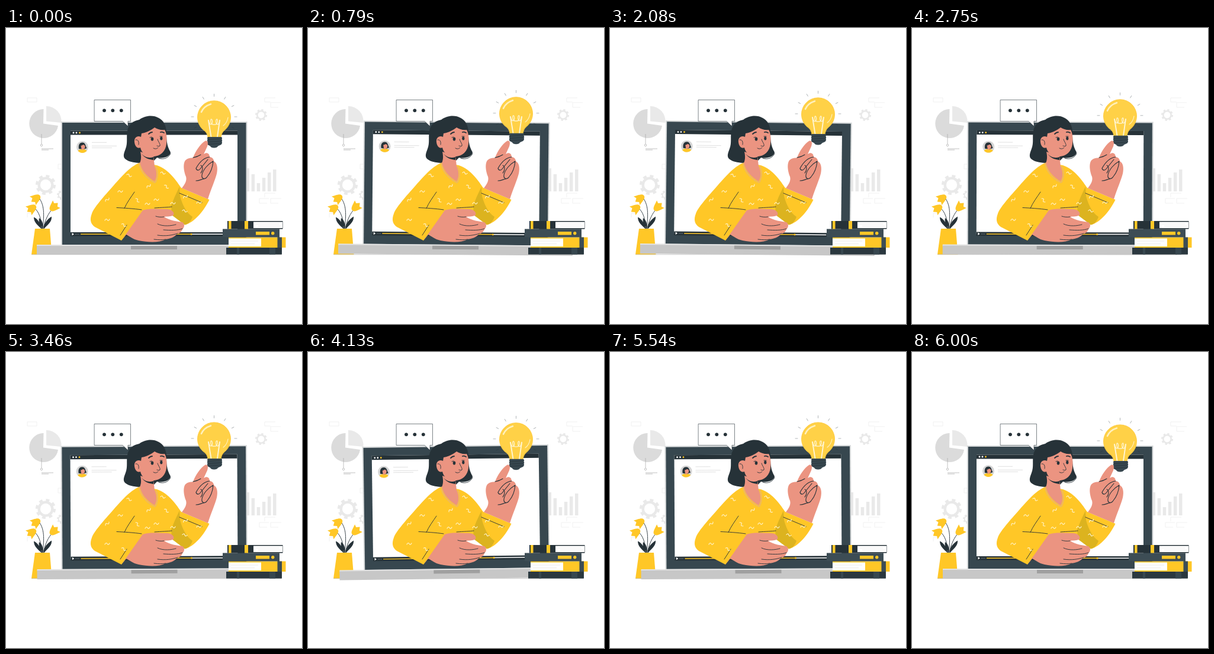
These frames come from a looping animation (500 by 500 pixels, 6.04 s). An HTML page:

```html
<!DOCTYPE html>
<html lang="en">
<head>
<meta charset="utf-8">
<title>Online lesson</title>
<style>
html, body { margin: 0; width: 100%; height: 100%; overflow: hidden; background: #fff; }
svg { display: block; width: 100%; height: 100%; }
.line { fill: none; stroke: #263238; stroke-linecap: round; stroke-linejoin: round; }
.faint { fill: none; stroke: #ebebeb; }
.dark { fill: #263238; }
.slate { fill: #37474f; }
.gold { fill: #ffc727; }
.skin { fill: #eb9481; }
</style>
</head>
<body>
<svg viewBox="0 0 500 500" stroke-width=".9">
  <!-- wall decorations -->
  <g id="wall">
    <path fill="#dbdbdb" d="M63 161.500L88 165A24.500 24.500 0 1 1 63.500 137Z"/>
    <path fill="#e9e9e9" d="M68 157.500V132A25.500 25.500 0 0 1 93.500 160Z"/>
    <path fill="none" stroke="#a6a6a6" stroke-width=".7" d="M60 179V196M60 204H80M60 206H72"/>
    <circle cx="60" cy="198" r="1.700" fill="#fff" stroke="#aaa" stroke-width=".7"/>
    <path class="faint" stroke-width=".7" d="M36 125V118H52V125ZM437 118H455M437 118V125H447M447 134V126H464M447 134H460M437 286V279H455M428 288H444M428 288V296H441M447 296V288H465M447 296H460M96 230H88V238H96M36 320V313H46"/>
  </g>

  <!-- plant -->
  <path class="line" d="M61.500 340C65 315 65 298 55 286M61 340C60 324 56 310 48 304M62.500 340C66 325 71 313 79 305"/>
  <path class="dark" d="M60.500 340C54 333 47 329 47 319.500C53 322 59 330 60.500 340ZM62 340C59 333 54 328 56 321C62 325 63 332 62 340ZM63.500 340C63 330 70 323 77 318.500C78 328 69 333 63.500 340Z"/>
  <g id="flowers" class="gold"></g>
  <path class="gold" d="M49 339H74L77.500 382.500H43Z"/>
  <path fill="none" stroke="#888" stroke-width=".4" d="M43 382.700H465"/>

  <g id="laptop">
    <path fill="#d5d8d9" d="M93 158H407.500V367H93Z"/>
    <path class="slate" d="M95 160H405.500V366H95Z"/>
    <path fill="#fff" d="M109 173.500H391V349H109Z"/>
    <path class="dark" d="M109 173.500H391V180.500H109ZM109 345H391V351.500H109Z"/>
    <g fill="#fff"><circle cx="114" cy="177" r="1.400"/><circle cx="119" cy="177" r="1.400"/></g>
    <circle class="gold" cx="124.500" cy="177" r="1.400"/>
    <path fill="#fff" d="M111.500 346L115 348.200L111.500 350.500ZM313 347.500H366V349H313Z"/>
    <path fill="none" stroke="#99a1a5" stroke-dasharray="1.500 1" d="M117 348.300H123.500"/>
    <path class="gold" d="M126 347.500H313V349H126Z"/>
    <circle class="gold" cx="313" cy="348.300" r="1.500"/>
    <circle cx="129" cy="201" r="10" fill="#d5d5d5"/>
    <path class="gold" d="M121.500 207.500C124 203.500 134 203.500 136.500 207.500A10 10 0 0 1 121.500 207.500Z"/>
    <path class="dark" d="M123 204C122 198 124 193.500 129 193.500C134 193.500 134 198 136.500 203L131 205Z"/>
    <path class="skin" d="M126.500 199L131 197L133.500 199C134 203 132 205 130 205L128 207Z"/>
    <path fill="none" stroke="#d3d3d3" stroke-width=".7" d="M145 193.300H170M145 199.300H187M145 202.300H179"/>
    <path fill="#e3e3e3" d="M52 366H448V369H52Z"/>
    <path fill="#c7c7c7" d="M52 368H448V383H52Z"/>
    <path fill="#a0a0a0" d="M211 368H289V374H211Z"/>
  </g>

  <!-- speech bubble -->
  <path class="line" stroke-width=".6" style="fill:#fff" d="M149.500 121.500H210.500V157.500H206V166L197 157.500H149.500Z"/>
  <g class="dark"><circle cx="166" cy="139.300" r="2.900"/><circle cx="180.300" cy="139.300" r="2.900"/><circle cx="194.800" cy="139.300" r="2.900"/></g>

  <g id="bulb">
    <g id="rays"></g>
    <path fill="#ffd147" stroke="#ffc93a" d="M341 185C340 177 337 175 332 171A28 28 0 1 1 371 171C366 175 364 178 363 185Z"/>
    <path fill="none" stroke="#fff6d5" stroke-width="1.900" stroke-linecap="round" d="M342 156L346.500 184M361 156L357 184"/>
    <path fill="none" stroke="#fff6d5" stroke-width="1.200" d="M342 156C345 168 350 162 348 155C345 150 344 165 351.500 163C359 165 358 150 355 155C353 162 359 168 361 156"/>
    <path fill="none" stroke="#fff0bd" stroke-width="2.600" stroke-linecap="round" d="M330 142C333 135 338 131 346 128.500"/>
    <path fill="none" stroke="#fff0bd" stroke-width="1.200" stroke-linecap="round" d="M375 151C374 158 371 162 367 165"/>
    <path class="slate" d="M341 184H364Q366 186 364.500 188Q366 190 364.500 192Q366 194 363.500 197L358 199.500C357 203.500 346 203.500 345 199.500L340.500 197Q339 194 340.500 192Q339 190 340.500 188Q339 186 341 184Z"/>
    <path class="line" stroke-width=".7" d="M341 188.500L364 187M341 192.500L364 191M341 196.500L363 195"/>
  </g>

  <!-- teacher -->
  <path class="dark" d="M225 155C234 148 248 146 258 152C266 156 270 164 271 174C271 188 271 198 278 210C277 217 267 221 255 219L248 226C232 230 212 228 204 223C196 219 199 212 202 204C206 194 203 184 205 174C207 163 214 157 225 155Z"/>
  <path class="line" d="M258 220C267 223 275 219 278 212M256 217C265 220 272 217 276 212"/>
  <path class="gold" d="M227 227C208 234 190 257 177 271.500C164 286 148 304 145 313.500C141 324 143 331 150 336L195 359L212 337L232 316L282 316L302 332.500C318 329 335 308 343.500 290L296 270C289 260 276 239 255 232Z"/>
  <path fill="#dcb31f" d="M293 268L285 285L279 300L280 316L302 332.500C309 331 313 325 315 319Q301 310 294 284Z"/>
  <path class="skin" d="M227 209C229 218 228 224 226 228C229 242 240 253 251 259C256 251 255 242 251 233L249 216Z"/>
  <path class="dark" d="M229 212C234 219 242 220 249 218V223C240 222 233 219 229 212Z"/>
  <path fill="none" stroke="#efb85e" stroke-width="2.600" stroke-linecap="round" stroke-dasharray="1 2.500" d="M225 229C228 244 240 256 252 261C257 252 257 242 253 233"/>
  <path class="skin" d="M228 184C222 181 216 185 217 193C218 201 223 204 227 202C229 212 238 218 248 217C261 217 270 208 271 195C272 185 271 177 268 172C262 173 256 171 251 168C245 173 236 177 229 178Z"/>
  <path class="line" d="M219 189C223 188 225 192 224 197M256 188C257 192 261 196 260 199C259 200 257 200 255 199M249 203C252 205 255 204 257 202"/>
  <path class="line" stroke-width="1.800" d="M241 179C243 177 245 176 247 176M261 176C263 175 265 176 267 177"/>
  <g class="dark"><ellipse cx="247" cy="187.500" rx="2.300" ry="3.100"/><ellipse cx="262.300" cy="186.500" rx="2.100" ry="3"/></g>
  <path class="line" d="M243 185L246 184M260 183L264 183"/>
  <path class="line" d="M217 277C211 286 204 295 200 304.500M187 303.500C198 304 216 305 229 307M204 333L193 350M293 279L331 295M251 304C263 303 273 303 280 302"/>
  <g id="squiggles"></g>
  <path class="skin" d="M195 359L231 308C242 304 259 306 270 306C280 306 285 311 283 316C279 319 273 318 267 319C276 325 290 327 298 328C303 332 301 337 298 340C297 344 293 347 289 348C284 354 276 356 270 357C258 363 240 362 224 359C214 357 208 351 203 349Z"/>
  <path class="line" d="M267 319C261 320 256 319 253 318M266 341C278 342 290 342 298 339M256 350C270 352 281 350 290 347M250 357C258 358 264 358 270 357M256 331C266 336 280 334 287 332"/>
  <path class="skin" d="M297 270.500C302 264 306 258 304 251C299 239 299 225 305 222C309 219 313 220 316 219C320 208 329 195 336 191C341 189 342 194 340 200L334 213C339 209 344 212 344 218C349 218 351 222 351 225C357 228 358 237 356 246C353 258 347 270 341 289Z"/>
  <path class="line" stroke-width="1.100" d="M316 219C321 218 326 216 329 214M344 218C334 219 326 228 321 237C322 241 326 241 328 238L341 222M350 225C341 230 333 239 331 248C330 255 336 257 340 251C346 244 349 236 350 225M329 232C333 234 333 240 329 245M321 258C327 258 331 255 334 255"/>

  <!-- books -->
  <path fill="#2b383f" d="M372 371H466V382.500H372Z"/>
  <path class="slate" d="M390 371H394V382.500H390ZM445 371H455V382.500H445Z"/>
  <path class="gold" d="M376 353.500H472.500V371H376Z"/>
  <path fill="#fff" d="M376 355.500H431V369H376Z"/>
  <path fill="none" stroke="#ddd" stroke-width=".6" d="M380 360H426M380 364.500H420"/>
  <path fill="#3d4d55" d="M458.500 353.500H466V371H458.500ZM366 339.500H462V353.500H366Z"/>
  <path class="gold" d="M422 344H445V349.500H422Z"/>
  <circle class="gold" cx="450.700" cy="346.800" r="2.700"/>
  <path class="dark" d="M374 326H467.500V339.500H374Z"/>
  <path fill="#fff" d="M418 327.500H467V338H418Z"/>
  <path fill="none" stroke="#ddd" stroke-width=".6" d="M422 331H462M426 334.500H464"/>
  <path class="gold" d="M376 326H380.500V339.500H376ZM403 326H409V339.500H403Z"/>
</svg>
<script>
const byId = id => document.getElementById(id);
const add = (id, markup) => byId(id).insertAdjacentHTML('beforeend', markup);

// Ring with eight teeth made from a dashed circle
function gear(x, y, r) {
  const rim = r * .87, tooth = rim * Math.PI / 8;
  const ring = (radius, width, extra = '') =>
    `<circle cx="${x}" cy="${y}" r="${radius}" stroke-width="${width}" ${extra}/>`;
  add('wall', `<g fill="none" stroke="#e9e9e9">${ring(r * .67, r * .26)}` +
    ring(rim, r * .27, `stroke-dasharray="${tooth}"`) + '</g>');
}
gear(67, 265, 17);
gear(431, 147, 10);
gear(94, 282, 8);

[237, 247, 262, 253, 244, 239].forEach((top, i) =>
  add('wall', `<path fill="#e9e9e9" d="M${405.500 + i * 9.100} ${top}h5.500V276h-5.500Z"/>`));

// Each flower hangs from the tip of its stem
[[55, 285, 55], [48, 302, 55], [77, 306, -135]].forEach(([x, y, turn]) =>
  add('flowers', `<path transform="translate(${x} ${y}) rotate(${turn})"
    d="M0 -3C5 -3 6 4 9 12L4 10L0 15L-4 10L-9 12C-6 4 -5 -3 0 -3Z"/>`));

for (let a = 150; a <= 390; a += 30)
  add('rays', `<path class="line" stroke-width=".5" opacity=".7" transform="translate(351.500 150) rotate(${a})" d="M34.500 0H38.500"/>`);

[[208, 249, 30], [193, 276, 0], [171, 290, -30], [171, 324, 0], [199, 333, 40],
 [222, 291, 60], [239, 297, 0], [254, 290, 0], [241, 267, -30], [265, 245, 20], [271, 268, 50],
 [282, 296, 0], [303, 285, -20], [326, 295, 0], [302, 309, 20]].forEach(([x, y, turn]) =>
  add('squiggles', `<path transform="translate(${x} ${y}) rotate(${turn})" fill="none" stroke="#fff3c9"
    stroke-width="1.200" stroke-linecap="round" d="M-4 1Q-2 -3 0 0T4 -1"/>`));

const LOOP = 6040, SWAY = 6000, FLOAT = 1500, LIFT = 6.5;

function draw() {
  const t = Math.min(performance.now() % LOOP, SWAY);
  const q = t / SWAY * 4;
  const angle = q < 1 ? q : q < 3 ? 2 - q : q - 4;
  const rise = 1 - Math.abs(t % FLOAT / FLOAT * 2 - 1);
  byId('laptop').setAttribute('transform', `rotate(${angle} 250 270.500)`);
  byId('bulb').setAttribute('transform', `translate(0 ${-LIFT * rise})`);
  requestAnimationFrame(draw);
}
draw();
</script>
</body>
</html>
```
